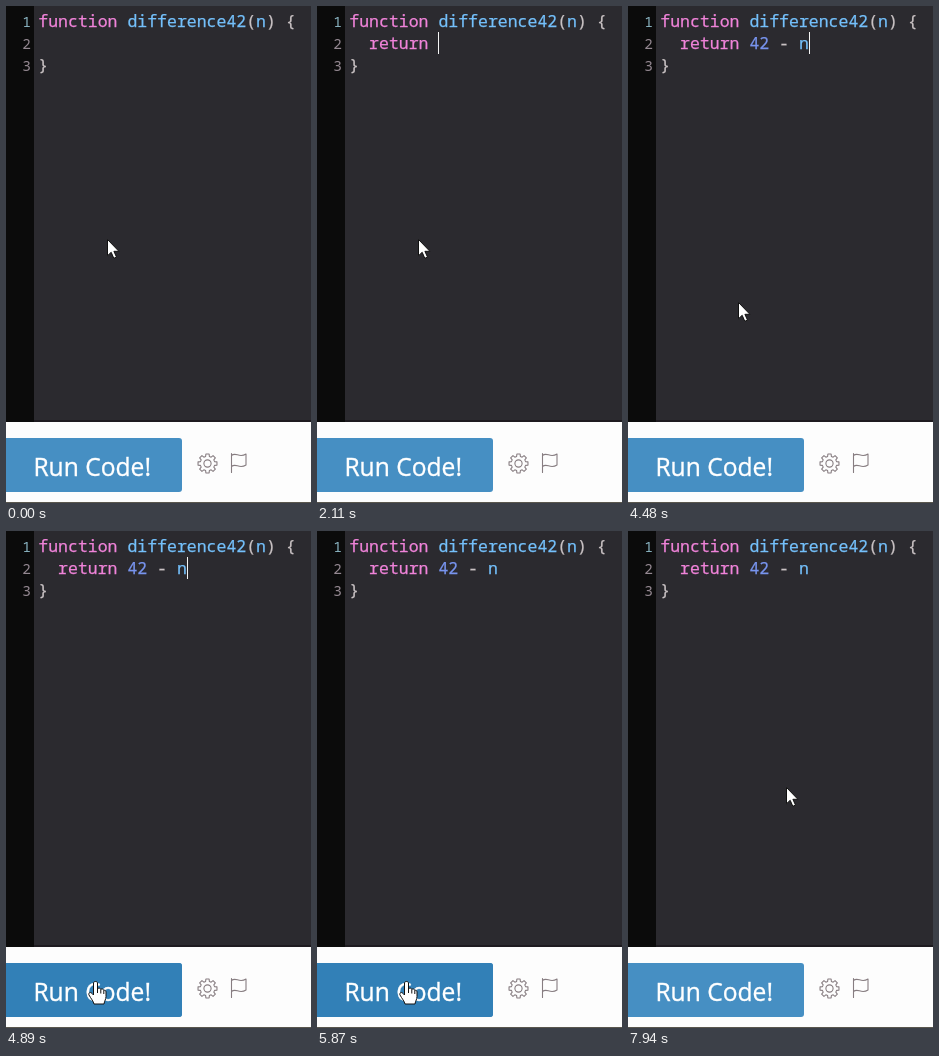
Animation, 305 px wide and 497 px high, one loop 8 s. Source, as an HTML page:

```html
<!DOCTYPE html>
<html lang="en">
<head>
<meta charset="utf-8">
<title>Typing and running code</title>
<style>
  html, body { margin: 0; width: 100%; height: 100%; overflow: hidden; background: #fdfdfd; }
  svg { display: block; width: 305px; height: 497px; }
  text { white-space: pre; }
  .code { font: 16.5px "Noto Sans Mono", monospace; stroke-width: .25; }
  .line-no { font: 14.5px "Noto Sans Mono", monospace; fill: #948891; text-anchor: end; }
  .line-no .active { fill: #8ab4c2; }
  .label { font: 24.6px "Open Sans", "Noto Sans", sans-serif; fill: #fff; stroke: #fff; stroke-width: .35; }
  .keyword { fill: #f083d9; stroke: #f083d9; }
  .name { fill: #74c0fb; stroke: #74c0fb; }
  .number { fill: #7894ee; stroke: #7894ee; }
  .punct { fill: #c9c2c4; stroke: #c9c2c4; }
  .icon { fill: none; stroke: #877d81; stroke-width: 1.1; stroke-linejoin: round; stroke-linecap: round; }
  .pointer { fill: #fff; stroke: #111; stroke-width: 1; stroke-linejoin: round; }
</style>
</head>
<body>
<svg viewBox="0 0 305 497">
  <rect width="305" height="416" fill="#2b2a2f"/>
  <rect y="414" width="305" height="2" fill="#1e1b20"/>
  <rect width="28" height="416" fill="#0b0b0b"/>
  <g class="line-no">
    <text class="active" x="25" y="21">1</text>
    <text x="25" y="43">2</text>
    <text x="25" y="65">3</text>
  </g>
  <g id="code" class="code"></g>
  <rect id="caret" y="26" width="1" height="22" fill="#f4f4f4"/>

  <rect x="-6" y="432" width="182" height="54" rx="3" fill="#468fc3"/>
  <rect id="hover" x="-6" y="432" width="182" height="54" rx="3" fill="#3280b7"/>
  <text class="label" x="27.4" y="470">Run Code!</text>
  <path id="gear" class="icon"/>
  <circle class="icon" cx="201.5" cy="457.5" r="3.6"/>
  <path class="icon" d="M225.5 447.5V466.5M225.5 449.500C230 445.500 233 452.500 240 448V459C233 463.500 230 456.500 225.500 460.500"/>
  <rect y="496" width="305" height="1" fill="#5a574e"/>

  <path id="arrow" class="pointer" d="M0 0V16.2L3.7 12.8L6.3 18.8L9 17.6L6.4 11.8H11.4Z"/>
  <path id="hand" class="pointer" d="M-2 1.5C-2-.5 2-.5 2 1.5V7.5C2.5 6 5 6.3 5.3 8C6 7 8 7.3 8.3 9C9.3 8.3 10.5 9 10.5 10.5V15C10.5 18 9 19 8.5 22.5H-1.5C-2 20-4.5 17-6.5 13.5C-7.5 11.5-5 10-3.5 12L-2 13.5ZM2 7.5V11.5M5.3 8V12M8.3 9V12.5"/>
</svg>
<script>
const LOOP = 8000, FRAME = 70;
const MOVE_START = 4260, MOVE_TIME = 590, LEAVE_START = 7640, LEAVE_TIME = 270;
const LAST_KEY = 3450, BLUR = 5800, BLINK = 515;

const $ = id => document.getElementById(id);
const columnX = column => 32.3 + 9.9 * column;
const progress = (t, start, duration) => Math.min(1, Math.max(0, (t - start) / duration));
const smooth = u => u * u * (3 - 2 * u);
const mix = (a, b, u) => a + (b - a) * u;
const show = (id, visible) => $(id).setAttribute('visibility', visible ? 'visible' : 'hidden');

function addToken(line, column, text, type) {
  const node = document.createElementNS('http://www.w3.org/2000/svg', 'text');
  node.setAttribute('x', columnX(column));
  node.setAttribute('y', 22 * line - 1);
  node.setAttribute('class', type);
  node.textContent = text;
  $('code').append(node);
  return node;
}

function tokenType(word) {
  if (/^(function|return)$/.test(word)) return 'keyword';
  if (/^\d/.test(word)) return 'number';
  return /^\w/.test(word) ? 'name' : 'punct';
}

function addLine(line, source) {
  return [...source.matchAll(/\w+|[^\w\s]/g)].map(({ 0: word, index }) =>
    ({ word, column: index, node: addToken(line, index, word, tokenType(word)) }));
}
addLine(1, 'function difference42(n) {');
const typedTokens = addLine(2, '  return 42 - n');
addLine(3, '}');

// Bursts of evenly spaced key presses
const bursts = [
  { text: 'return ', from: 1250, to: 2110 },
  { text: '42 ', from: 2370, to: 2570 },
  { text: '- ', from: 2830, to: 3100 },
  { text: 'n', from: LAST_KEY, to: LAST_KEY }
];
const keyTimes = bursts.flatMap(({ text, from, to }) =>
  [...text].map((_, i) => mix(from, to, i / Math.max(1, text.length - 1))));

function renderTyping(t) {
  const end = 2 + keyTimes.filter(time => time <= t).length;
  for (const { word, column, node } of typedTokens) {
    const shown = word.slice(0, Math.max(0, end - column));
    node.textContent = shown;
    node.setAttribute('class', tokenType(shown));
  }
  const typing = t >= keyTimes[0] && t < LAST_KEY;
  const blinkPhase = Math.floor((t - (t < LAST_KEY ? FRAME : LAST_KEY)) / BLINK);
  $('caret').setAttribute('x', Math.round(columnX(end)));
  show('caret', t < BLUR && (typing || blinkPhase % 2 === 0));
}

function renderPointer(t) {
  const held = MOVE_START + Math.floor((t - MOVE_START) / FRAME + .15) * FRAME;
  const down = smooth(progress(held, MOVE_START, MOVE_TIME));
  const leave = smooth(progress(held, LEAVE_START, LEAVE_TIME));
  const x = mix(mix(102, 90, down) + 16 * Math.sin(Math.PI * down), 159, leave);
  const y = mix(mix(234, 451, down), 256, leave);
  const hovering = y >= 432;
  for (const id of ['arrow', 'hand']) {
    $(id).setAttribute('transform', `translate(${Math.round(x) - .5} ${Math.round(y) - .5})`);
  }
  show('arrow', !hovering);
  show('hand', hovering);
  $('hover').setAttribute('opacity', progress(t, 4740, 140) - progress(t, 7720, 200));
}

function gearPath() {
  const points = [];
  for (let tooth = 0; tooth < 8; tooth++) {
    for (const [offset, radius] of [[-.26, 7.3], [-.17, 9.6], [.17, 9.6], [.26, 7.3]]) {
      const angle = tooth * Math.PI / 4 + offset;
      points.push(`${201.5 + radius * Math.cos(angle)} ${457.5 + radius * Math.sin(angle)}`);
    }
  }
  return `M${points.join('L')}Z`;
}
$('gear').setAttribute('d', gearPath());

const started = performance.now();
function tick() {
  const t = (performance.now() - started) % LOOP;
  renderTyping(t);
  renderPointer(t);
  requestAnimationFrame(tick);
}
tick();
</script>
</body>
</html>
```
